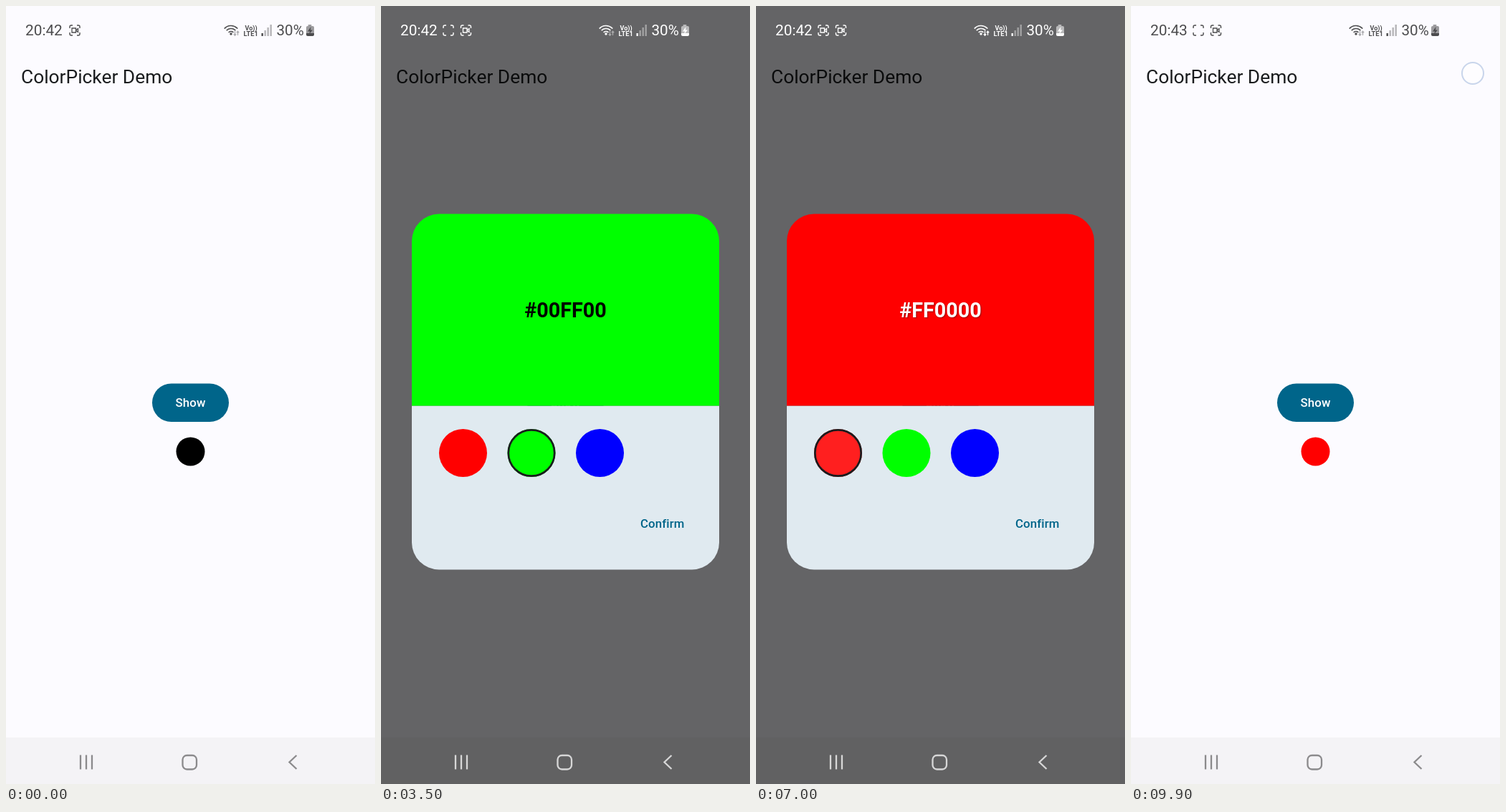
These frames come from a looping animation (515 by 1087 pixels, 10 s). An HTML page with a canvas:

```html
<!DOCTYPE html>
<html lang="en">
<head>
<meta charset="utf-8">
<title>ColorPicker Demo</title>
<style>
html, body { margin: 0; width: 515px; height: 1087px; overflow: hidden; background: #fcfbff; }
canvas { display: block; }
</style>
</head>
<body>
<canvas id="stage" width="515" height="1087"></canvas>
<script>
const g = document.getElementById('stage').getContext('2d');
const LOOP = 10000, STEP = 100;
const RED = [255, 0, 0], GREEN = [0, 255, 0], BLUE = [0, 0, 255], GREY = [170, 168, 170];
const swatches = [
  { x: 114.5, color: RED, hex: '#FF0000', ink: '#fff' },
  { x: 210, color: GREEN, hex: '#00FF00', ink: '#000' },
  { x: 305.5, color: BLUE, hex: '#0000FF', ink: '#fff' }
];
const unset = { color: GREY, hex: '#AAAAAA', ink: '#000' };

// Each tap holds its start time and the index of the swatch
const sessions = [
  { open: 1300, close: 3900, confirm: 3700, taps: [[2800, 1]] },
  { open: 5100, close: 8700, confirm: 8500, taps: [[6000, 2], [6800, 0], [7400, 1], [7900, 0]] }
];
// start, end, x, y
const touches = [
  [1200, 1500, 262, 556], [2800, 3000, 214, 626], [3700, 4100, 405, 730],
  [4900, 5200, 262, 556], [6000, 6200, 311, 625], [6800, 7000, 118, 626],
  [7400, 7600, 214, 626], [7900, 8100, 118, 626], [8500, 8900, 405, 730],
  [9900, 10100, 477, 94]
];

const ramp = (t, a, b) => Math.min(1, Math.max(0, (t - a) / (b - a)));
const mix = (a, b, k) => a.map((v, i) => v + (b[i] - v) * k);
const rgb = c => `rgb(${c.map(Math.round)})`;

function faded(alpha, draw) {
  g.save();
  g.globalAlpha *= alpha;
  draw();
  g.restore();
}

function disc(x, y, r, fill) {
  g.beginPath();
  g.arc(x, y, r, 0, 7);
  g.fillStyle = fill;
  g.fill();
}

function pill(x, y, w, h, r, fill) {
  g.beginPath();
  g.roundRect(x, y, w, h, r);
  g.fillStyle = fill;
  g.fill();
}

function label(str, x, y, size, weight, fill, align = 'left', spacing = 0) {
  g.font = `${weight} ${size}px Roboto, sans-serif`;
  g.letterSpacing = spacing + 'px';
  g.textAlign = align;
  g.fillStyle = fill;
  g.fillText(str, x, y);
}

function line(d, color, width) {
  g.strokeStyle = color;
  g.lineWidth = width;
  g.stroke(new Path2D(d));
}

function captureIcon(x, ink, camera) {
  g.save();
  g.translate(x, 34);
  line('M-7-3V-5Q-7-7-5-7H-3M3-7H5Q7-7 7-5V-3M7 3V5Q7 7 5 7H3M-3 7H-5Q-7 7-7 5V3', ink, 1.4);
  if (camera) line('M-4-3H1.5V3H-4ZM2-.5 4.5-2.5V2.5L2 .5', ink, 1.3);
  g.restore();
}

function statusBar(t, ink) {
  label(t < 9200 ? '20:42' : '20:43', 27, 41, 20.8, 400, ink);
  const shift = ramp(t, 0, 300);
  faded(shift, () => captureIcon(94, ink, t % 1000 < 500));
  captureIcon(96 + 22.5 * shift, ink, true);

  for (const r of [4.5, 8.5, 12.5]) {
    g.beginPath();
    g.arc(314, 40, r, -2.4, -0.74);
    g.strokeStyle = ink;
    g.lineWidth = 1.7;
    g.stroke();
  }
  disc(314, 39, 1.7, ink);
  faded(t >= 5500 && t < 8500 ? 1 : .45, () =>
    line('M319.5 35V41M317.8 39.3 319.5 41.2 321.2 39.3M323.5 41V35.5M321.8 37.2 323.5 35.3 325.2 37.2', ink, 1.3));

  label('Vo))', 333.5, 33.5, 9, 700, ink);
  label('LTE1', 331.5, 42, 9.3, 700, ink);
  g.fillStyle = ink;
  for (let i = 0; i < 4; i++) {
    faded(i ? .4 : 1, () => g.fillRect(356.5 + 4 * i, 38 - 4 * i, 2.4, 4 + 4 * i));
  }
  label('30%', 377.5, 41, 20.6, 400, ink);

  faded(.55, () => {
    pill(421.5, 26, 5, 2, 1, ink);
    pill(419, 28, 11, 10, [2, 2, 0, 0], ink);
  });
  pill(419, 38, 11, 4, [0, 0, 2, 2], ink);
  g.fillStyle = ink;
  g.fill(new Path2D('M425.5 29 421 35.5H424L423 39.5 428 33.5H425Z'));
}

function navBar(light) {
  const ink = light ? 'rgba(255,255,255,.75)' : 'rgba(0,0,0,.43)';
  line('M104 1046.5V1066.5M112 1046.5V1066.5M120 1046.5V1066.5', ink, 2.3);
  g.beginPath();
  g.roundRect(246.5, 1047, 19.5, 19.5, 6);
  g.stroke();
  line('M405.5 1047 395.5 1056.5 405.5 1066', ink, 2.3);
}

function homeScreen(t) {
  g.fillStyle = '#fcfbff';
  g.fillRect(0, 0, 515, 1087);
  g.fillStyle = '#f4f3f6';
  g.fillRect(0, 1022, 515, 65);
  label('ColorPicker Demo', 21, 108, 26.35, 400, '#1a1c1e');
  pill(204, 527.5, 107, 53.5, 26.75, '#00658a');
  const pressed = [1200, 4900].some(s => t >= s && t < s + 400);
  if (pressed) pill(204, 527.5, 107, 53.5, 26.75, 'rgba(255,255,255,.12)');
  label('Show', 257.5, 560, 16.77, 500, '#fff', 'center', .12);
  disc(257.5, 622.5, 20, rgb(t < 3900 ? [0, 0, 0] : t < 8700 ? GREEN : RED));
}

function dialog(t, s) {
  let now = unset, before = unset, tapped = -1e4;
  for (const [at, index] of s.taps) {
    if (t > at) {
      before = now;
      now = swatches[index];
      tapped = at;
    }
  }
  pill(43, 558.5, 429, 229, [0, 0, 38, 38], '#e0eaf0');
  pill(43, 290.5, 429, 268, [38, 38, 0, 0], rgb(mix(before.color, now.color, ramp(t, tapped, tapped + 200))));

  g.save();
  if (now.ink === '#fff') {
    g.shadowColor = 'rgba(0,0,0,.4)';
    g.shadowBlur = 2;
    g.shadowOffsetX = g.shadowOffsetY = 1;
  }
  label(now.hex, 257.5, 435, 28.75, 700, now.ink, 'center');
  g.restore();

  for (const sw of swatches) {
    disc(sw.x, 624.5, 33.5, rgb(sw.color));
    if (sw !== now) continue;
    disc(sw.x, 624.5, 33.5, `rgba(255,255,255,${.12 * (1 - ramp(t, tapped + 200, tapped + 500))})`);
    g.beginPath();
    g.arc(sw.x, 624.5, 32.2, 0, 7);
    g.strokeStyle = '#1a1c1e';
    g.lineWidth = 2.7;
    g.stroke();
  }
  if (t >= s.confirm) pill(347, 696, 93, 54, 27, 'rgba(0,101,138,.12)');
  label('Confirm', 362, 729, 16.77, 500, '#00658a', 'left', .12);
}

function pointer(t) {
  for (const [start, end, x, y] of touches) {
    if (t < start || t >= end) continue;
    faded(1 - ramp(t, end - 200, end), () => {
      if (y > 600 && y < 700) {
        const glow = g.createRadialGradient(x, y, 12, x, y, 22);
        glow.addColorStop(0, 'rgba(255,255,255,.4)');
        glow.addColorStop(1, 'rgba(255,255,255,0)');
        disc(x, y, 22, glow);
      }
      disc(x, y, 14, 'rgba(255,255,255,.55)');
      g.beginPath();
      g.arc(x, y, 15, 0, 7);
      g.strokeStyle = 'rgba(150,175,215,.5)';
      g.lineWidth = 2;
      g.stroke();
    });
  }
}

function render(t) {
  homeScreen(t);
  const s = sessions.find(s => t >= s.open && t < s.close + 300);
  let shown = 0;
  if (s) {
    shown = Math.min(ramp(t, s.open, s.open + 200), 1 - ramp(t, s.close, s.close + 150));
    const dim = Math.min(ramp(t, s.open, s.open + 300), 1 - ramp(t, s.close, s.close + 300));
    g.fillStyle = `rgba(0,0,0,${.6 * dim})`;
    g.fillRect(0, 0, 515, 1087);
    faded(shown, () => dialog(t, s));
  }
  statusBar(t, rgb(mix([76, 76, 78], [255, 255, 255], shown)));
  navBar(shown > .5);
  pointer(t);
}

const origin = performance.now();
function frame() {
  const t = (performance.now() - origin) % LOOP;
  render(Math.floor(t / STEP) * STEP);
  requestAnimationFrame(frame);
}
frame();
</script>
</body>
</html>
```
